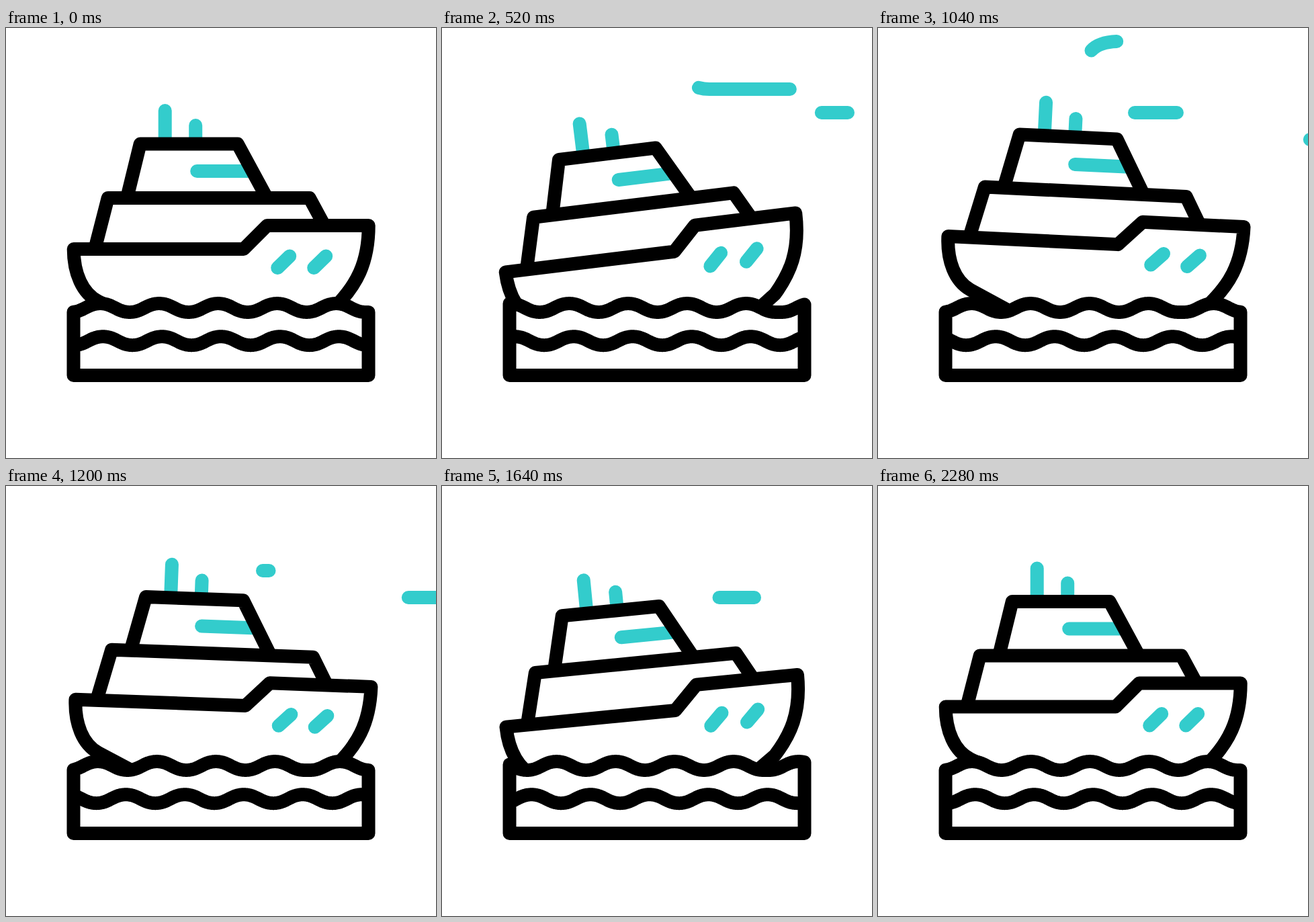
Animation of 640 by 640 pixels, one loop 2320 ms. Source, as an HTML page:

```html
<!DOCTYPE html>
<html lang="en">
<head>
<meta charset="utf-8">
<title>Ship at sea</title>
<style>
  html, body { margin: 0; width: 100%; height: 100%; overflow: hidden; background: #fff; }
  svg { display: block; width: 100%; height: 100%; }
  path { fill: none; stroke: #000; stroke-width: 20; stroke-linejoin: round; }
  .accent path { stroke: #3cc; stroke-linecap: round; }
  #water { fill: #fff; }
</style>
</head>
<body>
<svg viewBox="0 0 640 640">
  <g class="accent" id="wind">
    <path pathLength="1" d="M546 91H380C355 91 338 77 338 56C338 36 352 21 384 20"/>
    <path pathLength="1" d="M604 126H382"/>
    <path pathLength="1" d="M645 166H406"/>
  </g>
  <g id="ship">
    <g class="accent">
      <path d="M237 123V167M282.5 145V167M284.5 213H360"/>
      <path d="M404.5 357L422.5 339.5M458.5 357L476.5 339.5"/>
    </g>
    <path d="M181 250L200 172.5H345L387 250"/>
    <path d="M133 327L152 253H452L472 290"/>
    <path d="M198 436L138 407C114 395 101 365 101 329H354L389 294H540C540 352 520 383 495 410L455 438"/>
  </g>
  <path id="water"/>
  <path id="ripple"/>
</svg>
<script>
const LOOP = 2320, HALF = LOOP / 2, STEP = 40;
const LEFT = 100.5, RIGHT = 539.5, WAVE = 87.8;
const $ = id => document.getElementById(id);
const [gust, breeze, puff] = $('wind').children;

const ramp = (a, b, t) => Math.min(1, Math.max(0, (t - a) / (b - a)));
const ease = (a, b, t) => {
  const x = ramp(a, b, t);
  return x * x * (3 - 2 * x);
};

// Value at time t of [time, value] keys, blended by fn
function track(keys, t, fn = ease) {
  let v = keys[0][1];
  for (let i = 1; i < keys.length; i++) {
    const [a, from] = keys[i - 1], [b, to] = keys[i];
    v += (to - from) * fn(a, b, t);
  }
  return v;
}

const bob = [[0, 0], [280, 7.2], [765, -17.2], [HALF, 0]];
const tilt = [[0, 0], [187, 1.2], [565, -7.3], [1090, 3], [1640, -5.6], [2010, 0]];
const gustTail = [[80, 0], [320, .09], [720, .225], [1040, .86], [1140, 1]];

// Wave line between the tank walls, with a crest at the given x
// and its fifth trough widened by gap
function wave(crest, mid, gap = 0) {
  const seam = crest + 4.5 * WAVE, pts = [];
  for (let x = LEFT; x <= RIGHT; x++) {
    const u = x < seam ? x : Math.max(seam, x - gap);
    const p = (u - crest) / WAVE * 2 * Math.PI;
    const y = mid - 6.6 * (Math.cos(p) - .025 * Math.cos(3 * p));
    pts.push(x + ' ' + y.toFixed(2));
  }
  return 'M' + pts.join('L');
}

// Shows the part of a path between two fractions of its length
function trim(path, tail, head) {
  const len = head - tail;
  path.style.display = len > .004 ? '' : 'none';
  path.setAttribute('stroke-dasharray', len + ' 3');
  path.setAttribute('stroke-dashoffset', -tail);
}

function draw(t) {
  const y = track(bob, t % HALF), angle = track(tilt, t);
  $('ship').setAttribute('transform', `translate(-.3 ${y}) rotate(${angle} 420 398)`);

  const sway = ease(0, HALF, t) - ease(HALF, LOOP, t);
  $('water').setAttribute('d', wave(140.2 - 91.5 * sway, 416.5, 9) + `V517H${LEFT}Z`);
  $('ripple').setAttribute('d', wave(144.3 + 122.3 * sway, 465.7));

  gust.setAttribute('transform', `translate(${.09 * (720 - t)} 0)`);
  trim(gust, track(gustTail, t, ramp), ease(88, 830, t));
  trim(breeze, ease(582, 1288, t), ease(330, 1040, t));
  trim(puff, ease(1160, 1870, t), ease(1000, 1710, t));
}

const start = performance.now();
function tick() {
  const t = (performance.now() - start) % LOOP;
  draw(Math.floor(t / STEP) * STEP);
  requestAnimationFrame(tick);
}
tick();
</script>
</body>
</html>
```
